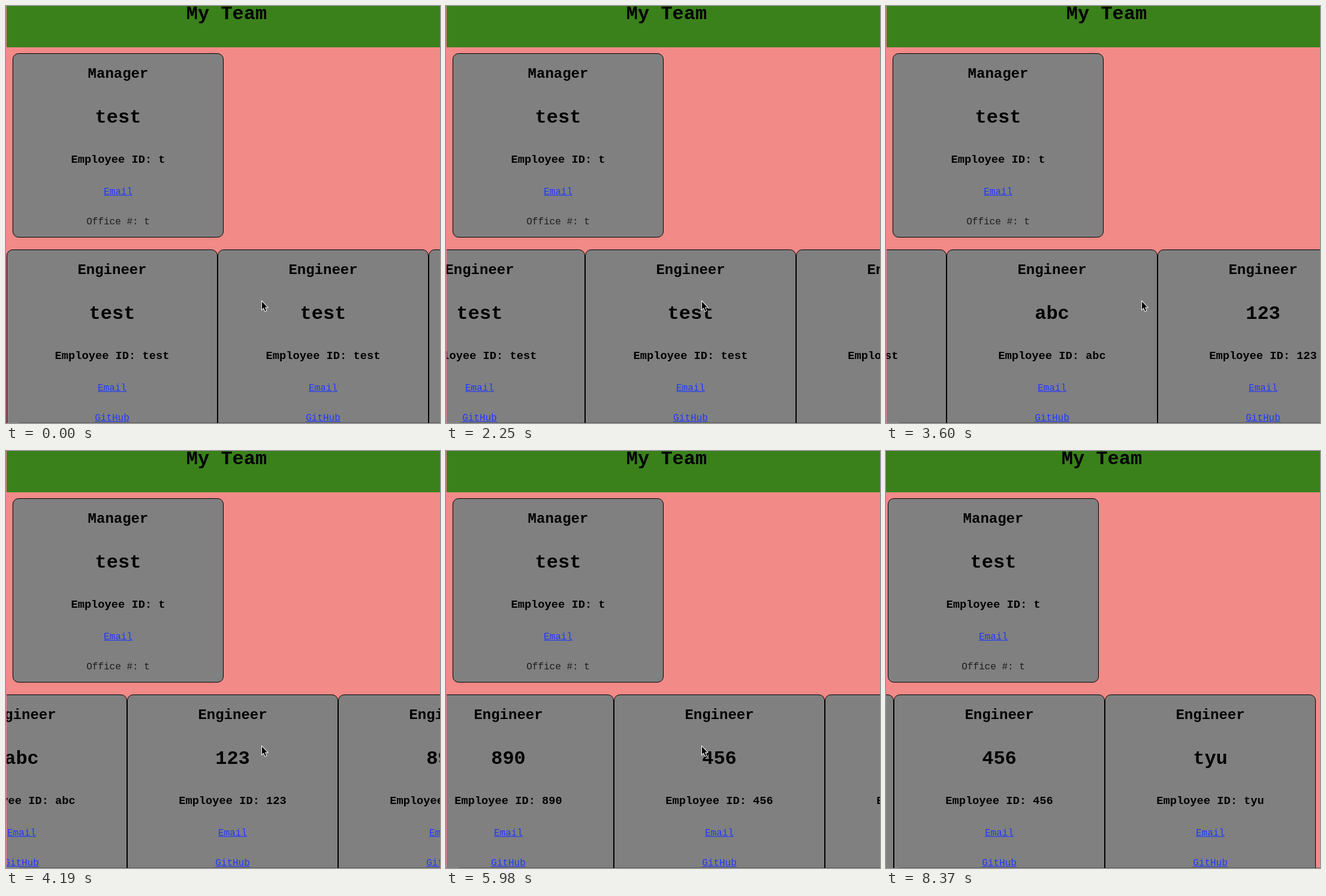
An HTML page with a canvas for the animation above (8670 ms loop, 724 by 697 pixels).

```html
<!DOCTYPE html>
<html lang="en">
<head>
<meta charset="utf-8">
<title>My Team</title>
<style>
  html, body { margin: 0; width: 100%; height: 100%; overflow: hidden; background: #f28a88; }
  canvas { display: block; }
</style>
</head>
<body>
<canvas id="stage" width="724" height="697"></canvas>
<script>
const ctx = document.getElementById('stage').getContext('2d');
const LOOP = 8670, W = 724, H = 697, CARD_W = 352, CARD_H = 308;
const PINK = '#f28a88', GREEN = '#3a811c', GRAY = '#808080', LINK = '#1e37ff';
const FAMILY = '"Courier New", "Liberation Mono", monospace';
const engineers = ['test', 'test', 'abc', '123', '890', '456', 'tyu'];

// [time, scroll offset] of the engineer row
const scrollKeys = [[1500, 0], [2250, 121], [3000, 347], [4190, 855],
                    [5240, 1185], [5980, 1481], [6580, 1740]];

// The picture is refreshed every 150 ms, restarting at these times
function refreshTime(t) {
  const base = [5980, 3740, 1650].find(start => t >= start);
  return base ? base + Math.floor((t - base) / 150) * 150 : 0;
}

function slope(i) {
  const before = scrollKeys[i - 1], after = scrollKeys[i + 1];
  return before && after ? (after[1] - before[1]) / (after[0] - before[0]) : 0;
}

function rowScroll(time) {
  const t = refreshTime(time), last = scrollKeys.length - 1;
  if (t <= scrollKeys[0][0]) return 0;
  if (t >= scrollKeys[last][0]) return scrollKeys[last][1];
  const i = scrollKeys.findIndex(key => key[0] > t) - 1;
  const [t0, a] = scrollKeys[i], [t1, b] = scrollKeys[i + 1];
  const d = t1 - t0, u = (t - t0) / d, v = 1 - u;
  return Math.round(a * v * v * (1 + 2 * u) + b * u * u * (3 - 2 * u)
    + d * u * v * (v * slope(i) - u * slope(i + 1)));
}

// The page overshoots sideways, then settles
function pageScroll(t) {
  return t < 7180 ? 0 : t < 7480 ? 11 : t < 7630 ? 9 : 8;
}

function cursorPosition(t) {
  if (t < 8080) return [427, 494];
  if (t < 8230) return [530, 566];
  return t < 8370 ? [714, 658] : null;
}

function text(string, x, y, size, { bold = true, color = '#000' } = {}) {
  ctx.font = `${bold ? 'bold ' : ''}${size}px ${FAMILY}`;
  ctx.fillStyle = color;
  ctx.fillText(string, x, y);
}

function link(label, x, y) {
  text(label, x, y, 16, { bold: false, color: LINK });
  const width = Math.round(ctx.measureText(label).width);
  ctx.fillRect(Math.round(x - width / 2), y + 1, width, 1);
}

function card(x, y, role, name, id) {
  const center = x + CARD_W / 2;
  ctx.beginPath();
  ctx.roundRect(x + .5, y + .5, CARD_W - 1, CARD_H - 1, 9.5);
  ctx.fillStyle = GRAY;
  ctx.fill();
  ctx.strokeStyle = '#000';
  ctx.lineWidth = 1;
  ctx.stroke();
  text(role, center, y + 41, 24);
  text(name, center, y + 116, 32);
  text('Employee ID: ' + id, center, y + 183, 18.72);
  link('Email', center, y + 236);
  if (role === 'Manager') text('Office #: t', center, y + 286, 16, { bold: false, color: '#1c1c1c' });
  else link('GitHub', center, y + 286);
}

function cursor(x, y) {
  ctx.save();
  ctx.translate(x, y);
  const arrow = new Path2D('M0 0V13L3 10.2L5.2 16L7.2 15.2L4.9 9.5H9Z');
  ctx.strokeStyle = '#fff';
  ctx.lineWidth = 2;
  ctx.stroke(arrow);
  ctx.fillStyle = '#000';
  ctx.fill(arrow);
  ctx.restore();
}

function draw(t) {
  const left = 1 - pageScroll(t), scroll = rowScroll(t);
  ctx.fillStyle = PINK;
  ctx.fillRect(0, 0, W, H);
  ctx.textAlign = 'center';

  ctx.fillStyle = GREEN;
  ctx.fillRect(left, 0, W + 20, 69);
  text('My Team', left + 367, 22, 32);
  card(left + 10, 79, 'Manager', 'test', 't');

  ctx.save();
  ctx.beginPath();
  ctx.rect(left, 400, W, H);
  ctx.clip();
  engineers.forEach((name, i) => {
    const x = left + i * CARD_W - scroll;
    if (x < W && x + CARD_W > 0) card(x, 407, 'Engineer', name, name);
  });
  ctx.restore();

  ctx.fillStyle = 'rgba(0, 0, 0, .3)';
  ctx.fillRect(22, H - 1, W, 1);

  const pointer = cursorPosition(t);
  if (pointer) cursor(...pointer);
}

const start = performance.now();
function tick() {
  draw((performance.now() - start) % LOOP);
  requestAnimationFrame(tick);
}
tick();
</script>
</body>
</html>
```
